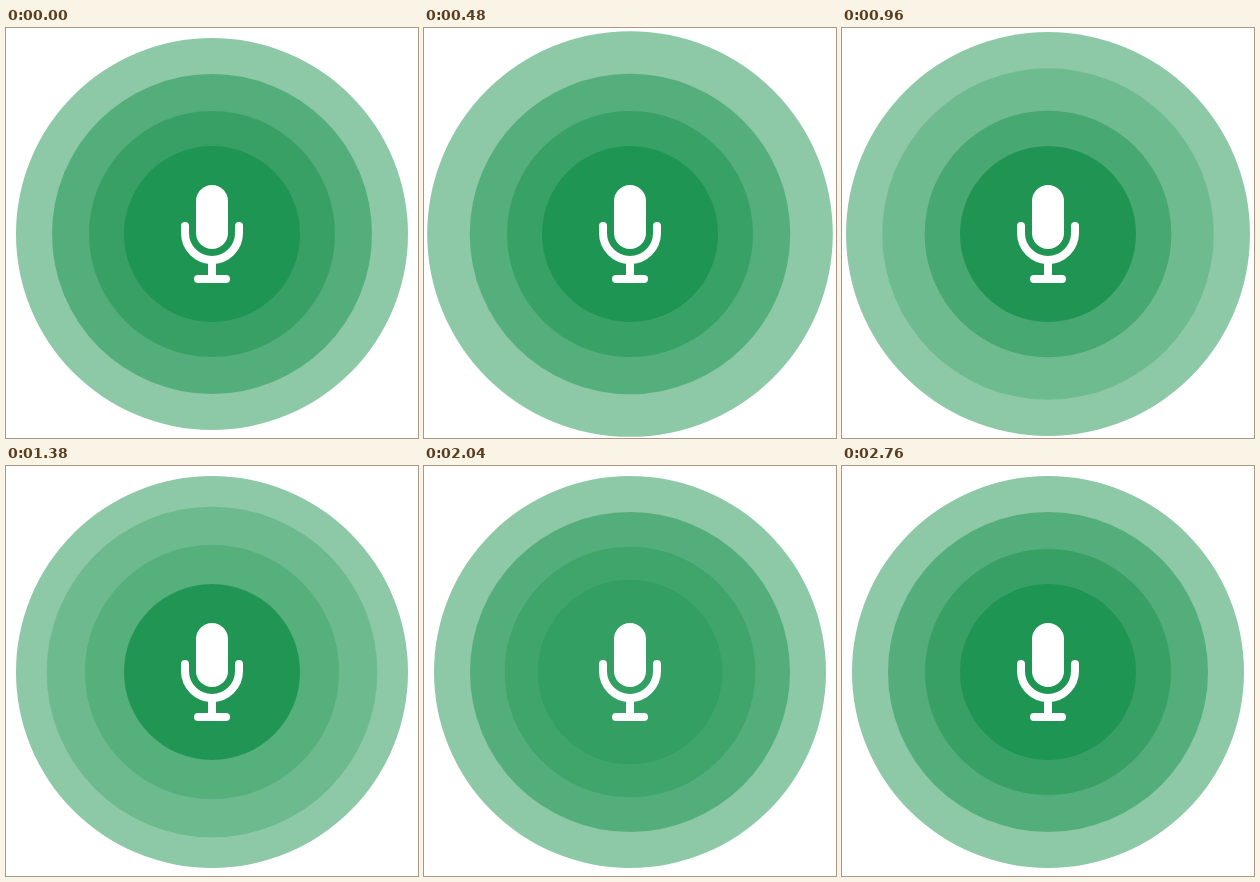
Write an HTML page that moves like this. It is 412 px wide and 410 px high and loops after 4.77 s.

```html
<!DOCTYPE html>
<html lang="en">
<head>
<meta charset="utf-8">
<title>Microphone pulse</title>
<style>
  html, body { margin: 0; width: 100%; height: 100%; overflow: hidden; background: #fff; }
  svg { display: block; width: 412px; height: 410px; }
  .ring { fill: rgb(28, 148, 80); }
  .mic { fill: none; stroke: #fff; stroke-width: 8; stroke-linecap: round; }
</style>
</head>
<body>
<svg viewBox="0 0 412 410">
  <g id="rings"></g>
  <rect x="190" y="157" width="32" height="64" rx="16" fill="#fff"/>
  <path class="mic" d="M179 198v7a27 27 0 0 0 54 0v-7M206 232v19M192 251h28"/>
</svg>
<script>
  const LOOP = 4770, STEP = 60, PULSE = 1380, DELAY = 460;
  const GROW = 0.05, FADE = 0.65;

  // Outermost first; each translucent disc tints the ones below it.
  const rings = [
    { r: 196, alpha: 0.5, fade: 0 },
    { r: 160, alpha: 0.5, fade: FADE },
    { r: 123, alpha: 0.5, fade: FADE },
    { r: 88, alpha: 0.9, fade: FADE }
  ];

  const group = document.getElementById('rings');
  for (const ring of rings) {
    ring.el = document.createElementNS(group.namespaceURI, 'circle');
    ring.el.setAttribute('class', 'ring');
    ring.el.setAttribute('cx', 206);
    ring.el.setAttribute('cy', 206);
    group.appendChild(ring.el);
  }

  // Linear rise and fall: 0 -> 1 -> 0 over one pulse.
  const pulse = t => Math.max(0, 1 - Math.abs(2 * t / PULSE - 1));

  function draw(now) {
    const t = Math.min(Math.floor(now % LOOP / STEP) * STEP, PULSE + 3 * DELAY);
    rings.forEach(({ el, r, alpha, fade }, i) => {
      const k = pulse(t - i * DELAY);
      el.setAttribute('r', r * (1 + GROW * k));
      el.setAttribute('fill-opacity', alpha * (1 - fade * k));
    });
  }

  const start = performance.now();
  function tick() {
    draw(performance.now() - start);
    requestAnimationFrame(tick);
  }
  tick();
</script>
</body>
</html>
```
